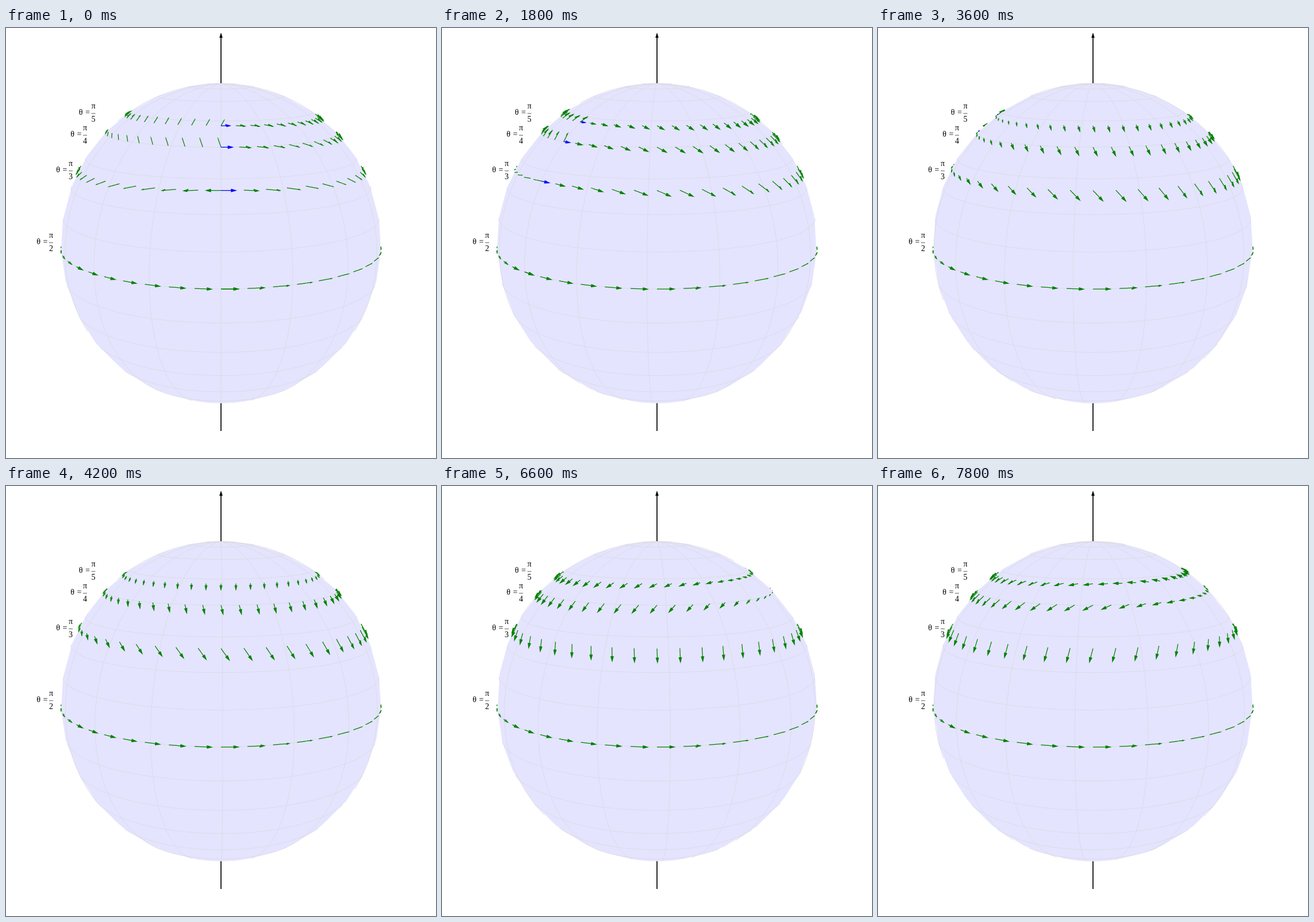
An HTML page with a canvas for the animation above (8 s loop, 748 by 748 pixels).

```html
<!DOCTYPE html>
<html lang="en">
<head>
<meta charset="utf-8">
<title>Parallel transport on a sphere</title>
<style>
html, body { margin: 0; width: 100%; height: 100%; overflow: hidden; background: #fff; }
canvas { display: block; width: 748px; height: 748px; }
</style>
</head>
<body>
<canvas id="stage" width="748" height="748"></canvas>
<script>
const ctx = document.getElementById('stage').getContext('2d');
const { PI, sin, cos, hypot, min } = Math;
const DEG = PI / 180, STEP = 8 * DEG, MESH = PI / 16;
const DIST = 5.6, FOCAL = 1534.5, TILT = 13.88 * DEG;
const LOOP = 8000, TICK = 300, BODY = 0.998;

// World axes: right, toward the viewer, up. View axes: x, y, depth.
const view = ([r, o, u]) => [
  r,
  u * cos(TILT) - o * sin(TILT),
  u * sin(TILT) + o * cos(TILT)
];
const point = (th, ph) => [sin(th) * sin(ph), sin(th) * cos(ph), cos(th)];
const project = ([x, y, z]) => {
  const s = FOCAL / (DIST - z);
  return [374 + x * s, 374.5 - y * s];
};
const add = (a, b, k) => a.map((v, i) => v + b[i] * k);

// Is a point in view space hidden by the ball?
function hidden(p) {
  const d = [p[0], p[1], p[2] - DIST];
  const dd = d[0] * d[0] + d[1] * d[1] + d[2] * d[2];
  const t = -DIST * d[2] / dd;
  if (t >= 1) return hypot(...p) < BODY;
  return hypot(t * d[0], t * d[1], DIST + t * d[2]) < BODY;
}

function segment(a, b) {
  ctx.moveTo(...a);
  ctx.lineTo(...b);
}

function drawAxis() {
  ctx.strokeStyle = ctx.fillStyle = '#000';
  ctx.lineWidth = 1.7;
  ctx.beginPath();
  segment([374, 14], [374, 701]);
  ctx.stroke();
  ctx.beginPath();
  ctx.moveTo(374, 8);
  ctx.lineTo(376.8, 17);
  ctx.lineTo(371.2, 17);
  ctx.fill();
}

function drawBall(turn) {
  // All front facets go into one path, so no seams show.
  ctx.fillStyle = '#e4e4ff';
  ctx.beginPath();
  for (let i = 0; i < 16; i++) for (let j = 0; j < 32; j++) {
    const q = [[0, 0], [1, 0], [1, 1], [0, 1]].map(([a, b]) =>
      project(view(point((i + a) * MESH, (j + b) * MESH + turn))));
    const area = (q[2][0] - q[0][0]) * (q[3][1] - q[1][1])
               - (q[2][1] - q[0][1]) * (q[3][0] - q[1][0]);
    if (area > 0) continue;
    q.forEach((p, n) => n ? ctx.lineTo(...p) : ctx.moveTo(...p));
    ctx.closePath();
  }
  ctx.fill();

  ctx.strokeStyle = '#dcdce5';
  ctx.lineWidth = 1;
  ctx.beginPath();
  const piece = (t1, p1, t2, p2) => {
    const a = view(point(t1, p1)), b = view(point(t2, p2));
    if (min(a[2], b[2]) > 1 / DIST) segment(project(a), project(b));
  };
  const fine = MESH / 2;
  for (let i = 1; i < 16; i++)
    for (let j = 0; j < 64; j++)
      piece(i * MESH, j * fine + turn, i * MESH, (j + 1) * fine + turn);
  for (let i = 0; i < 16; i++)
    for (let j = 0; j < 32; j++)
      piece(j * fine, i * 2 * MESH + turn, (j + 1) * fine, i * 2 * MESH + turn);
  ctx.stroke();
}

function drawArrow(th, ph, spin, color) {
  const east = [cos(ph), -sin(ph), 0];
  const south = [cos(th) * sin(ph), cos(th) * cos(ph), -sin(th)];
  const dir = add(east.map(v => v * cos(spin)), south, sin(spin));
  const at = k => view(add(point(th, ph), dir, 0.0975 * sin(th) * k));
  const tip = at(1), from = project(at(0)), to = project(tip);
  const dx = to[0] - from[0], dy = to[1] - from[1], len = hypot(dx, dy) || 1;

  ctx.strokeStyle = color;
  ctx.lineWidth = 1.25;
  ctx.beginPath();
  const parts = 12, end = 0.86;
  for (let i = 0; i < parts; i++) {
    if (hidden(at((i + 0.5) / parts * end))) continue;
    segment(project(at(i / parts * end)), project(at((i + 1) / parts * end)));
  }
  ctx.stroke();

  // The head is flat to the viewer at the depth of the tip.
  const ux = dx / len, uy = dy / len;
  const size = min(10.5, len * 0.75), slices = 12;
  const scale = (DIST - tip[2]) / FOCAL;
  ctx.lineWidth = size / slices * 1.25;
  ctx.beginPath();
  for (let i = 0; i < slices; i++) for (const side of [-1, 1]) {
    const back = (i + 0.5) / slices * size, half = back * 0.28 * side;
    const ox = -ux * back, oy = -uy * back;
    const ex = ox - uy * half, ey = oy + ux * half;
    const mid = [tip[0] + (ox + ex) / 2 * scale, tip[1] - (oy + ey) / 2 * scale, tip[2]];
    if (!hidden(mid)) segment([to[0] + ox, to[1] + oy], [to[0] + ex, to[1] + ey]);
  }
  ctx.stroke();
}

function drawLabel(n, x, y) {
  ctx.fillStyle = ctx.strokeStyle = '#000';
  ctx.font = '14px "Liberation Serif", "Times New Roman", serif';
  ctx.textAlign = 'center';
  ctx.fillText('θ', x, y);
  ctx.fillText('=', x + 12, y);
  ctx.fillText('π', x + 22, y - 11);
  ctx.fillText(n, x + 22, y + 12);
  ctx.lineWidth = 0.6;
  ctx.beginPath();
  segment([x + 18.5, y - 2.5], [x + 25.5, y - 2.5]);
  ctx.stroke();
}

const rows = [[2, 56.5, 376], [3, 90.5, 251], [4, 115.5, 189], [5, 130, 151]];

function draw(step) {
  ctx.fillStyle = '#fff';
  ctx.fillRect(0, 0, 748, 748);
  drawAxis();
  drawBall(-step * STEP);
  for (const [n, x, y] of rows) {
    const th = PI / n;
    for (let k = 45; k >= 0; k--)
      drawArrow(th, (k - step) * STEP, k * STEP * cos(th), k || n === 2 ? '#008000' : '#00f');
    drawLabel(n, x, y);
  }
}

const start = performance.now();
let shown = -1;
function tick() {
  const step = Math.floor((performance.now() - start) % LOOP / TICK);
  if (step !== shown) draw(shown = step);
  requestAnimationFrame(tick);
}
tick();
</script>
</body>
</html>
```
